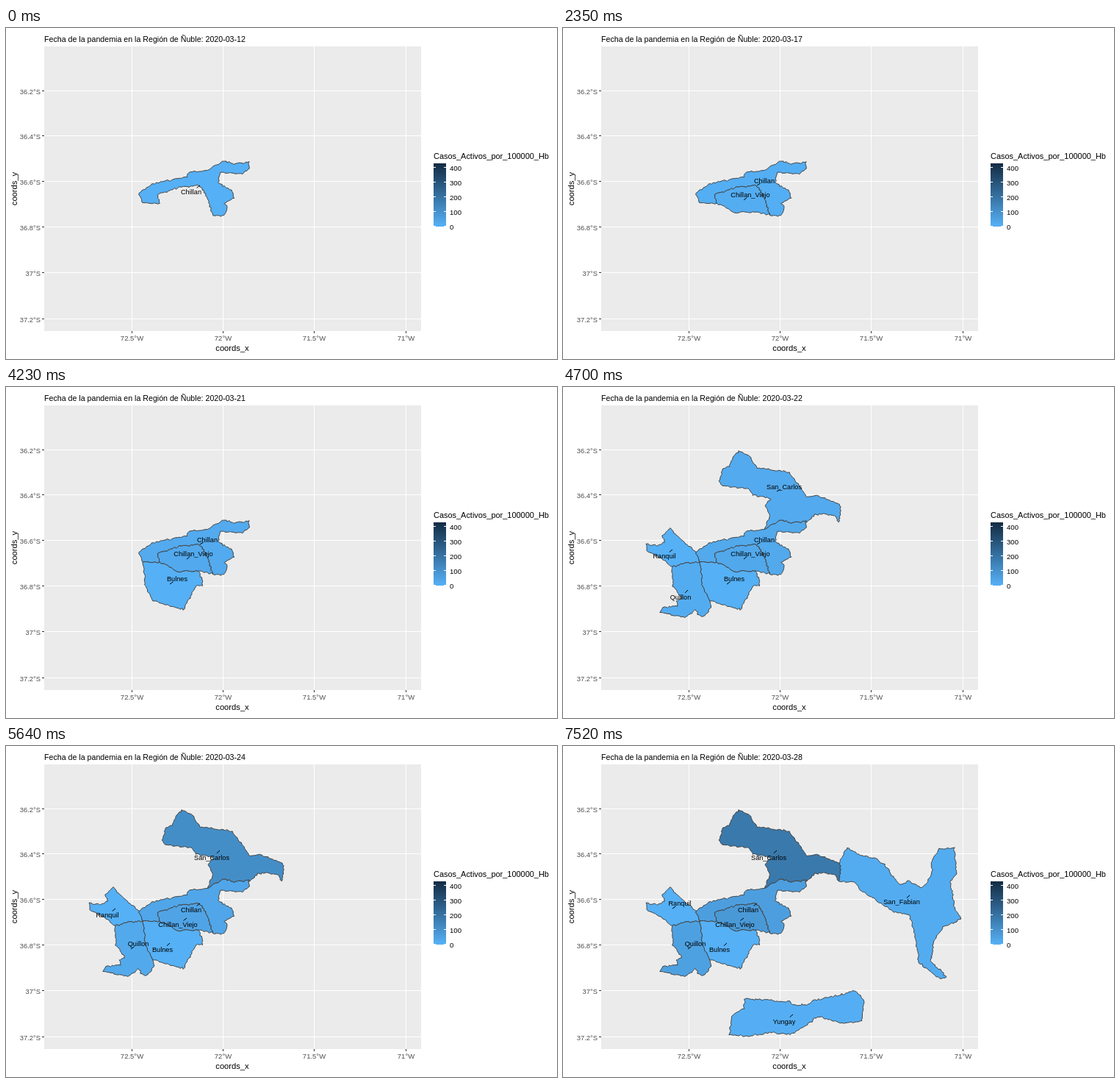
Recreate the animation shown at these times as an HTML page with a canvas. Size 750 by 450 pixels, loop 7.99 s.

```html
<!DOCTYPE html>
<html lang="es">
<head>
<meta charset="utf-8">
<style>
html, body { margin: 0; width: 100%; height: 100%; overflow: hidden; background: #fff; }
canvas { display: block; }
</style>
</head>
<body>
<canvas id="stage" width="750" height="450"></canvas>
<script>
const ctx = document.getElementById('stage').getContext('2d');
const STEP = 470, STEPS = 17, LAST = STEPS - 1;

// Key points of borders shared by two regions; outline() adds the fine detail.
const carlosChillan = '273,193 285,186 297,180 308,184 330,182';
const chillanViejo = '281,254 273,229 263,213 236,216 206,226 209,238';
const chillanBulnes = '209,238 186,238';
const chillanRanquil = '186,238 180,223';
const viejoBulnes = '209,238 218,241 232,251 262,249';
const bulnesQuillon = '186,238 189,270 200,290';
const ranquilQuillon = '186,238 165,239 148,244';
const carlosFabian = '375,158 378,168 374,184';
const back = border => border.split(' ').reverse().join(' ');

// Labels flip above (1) or below (0) their point at each step.
const flips = step => '01110110111001010'[step] === '1';
const never = () => false;

// shade: first and last percent of the colour scale, and the power of the growth curve.
const regions = [
  { name: 'Chillan', start: 0, point: [264, 214], below: [252, 223], above: [274, 208], isAbove: flips, shade: [1, 14, 2],
    path: `180,223 200,211 224,206 245,202 249,195 ${carlosChillan} 330,190 322,198 291,195 288,210 306,220 310,230 297,238 301,243 296,255 ${chillanViejo} ${chillanBulnes} ${chillanRanquil}` },
  { name: 'Chillan_Viejo', start: 4, point: [246, 234], below: [234, 243], above: [255, 227], isAbove: flips, shade: [3, 18, 2],
    path: `${chillanViejo} ${viejoBulnes}` },
  { name: 'Bulnes', start: 8, point: [223, 268], below: [213, 277], above: [233, 261], isAbove: flips, shade: [1, 1, 1],
    path: `${viejoBulnes} 268,269 258,270 241,302 222,297 ${back(bulnesQuillon)} ${back(chillanBulnes)}` },
  { name: 'San_Carlos', start: 10, point: [291, 142], below: [280, 152], above: [301, 136], isAbove: flips, shade: [5, 42, 0.5],
    path: `239,87 253,94 264,109 292,113 307,115 332,149 346,147 ${carlosFabian} 371,176 354,171 343,173 330,184 ${back(carlosChillan)} 281,176 275,162 282,151 258,146 252,137 216,134 212,127 217,111 226,107 233,92` },
  { name: 'Ranquil', start: 10, point: [149, 221], below: [138, 230], above: [159, 214], isAbove: step => step % 2 || step === LAST, shade: [1, 1, 1],
    path: `145,192 158,205 ${back(chillanRanquil)} ${ranquilQuillon} 131,231 113,222 113,213 130,215 138,210 135,202` },
  { name: 'Quillon', start: 10, point: [170, 276], below: [160, 286], above: [180, 269], isAbove: step => step > 11, shade: [4, 12, 1.5],
    path: `${back(ranquilQuillon)} ${bulnesQuillon} 201,298 193,311 184,310 180,302 167,313 132,306 136,299 156,297 153,291 161,287 149,270` },
  { name: 'San_Fabian', start: 16, point: [472, 203], below: [461, 212], isAbove: never, shade: [4, 4, 1],
    path: `375,158 386,138 402,147 425,153 437,160 453,183 461,188 469,182 486,192 494,188 502,170 500,158 512,139 532,138 535,174 527,184 533,222 542,235 517,246 504,266 500,292 522,313 512,316 484,294 480,262 471,230 448,224 404,195 396,184 ${back(carlosFabian)}` },
  { name: 'Yungay', start: 16, point: [313, 365], below: [301, 375], isAbove: never, shade: [2, 2, 1],
    path: `226,392 229,366 246,356 247,343 308,347 313,352 332,351 340,346 384,336 397,332 409,345 406,374 377,376 346,367 328,382 309,391 283,389 250,394` }
];

const noise = (x, y) => {
  const v = Math.sin(x * 12.9898 + y * 78.233) * 43758.5453;
  return (v - Math.floor(v)) * 2 - 1;
};

// Roughens each edge by position only, so neighbours keep a common border.
function outline(path) {
  const points = path.split(' ').map(pair => pair.split(',').map(Number));
  const shape = new Path2D();
  points.forEach(([x, y], i) => {
    const [nx, ny] = points[(i + 1) % points.length];
    const pieces = Math.max(1, Math.round(Math.hypot(nx - x, ny - y) / 2.5));
    for (let k = 0; k < pieces; k++) {
      const px = Math.round(x + (nx - x) * k / pieces + 0.01);
      const py = Math.round(y + (ny - y) * k / pieces + 0.01);
      shape.lineTo(px + noise(px, py) + 0.5, py + noise(py, px) + 0.5);
    }
  });
  shape.closePath();
  return shape;
}
regions.forEach(region => region.shape = outline(region.path));

const LOW = [86, 177, 247], HIGH = [19, 43, 67];
const scaleColor = f => `rgb(${LOW.map((c, i) => Math.round(c + (HIGH[i] - c) * f))})`;

function text(str, x, y, size, align = 'left', color = '#000') {
  ctx.font = `${size}px "Liberation Sans", Arial, sans-serif`;
  ctx.textAlign = align;
  ctx.fillStyle = color;
  ctx.fillText(str, x, y);
}
function box(x, y, w, h, color) {
  ctx.fillStyle = color;
  ctx.fillRect(x, y, w, h);
}

function drawAxes() {
  box(52, 25, 513, 387, '#ebebeb');
  for (let i = 0; i < 6; i++) {
    const y = Math.round(85 + 61.3 * i + 0.14 * i * i); // spacing grows southward
    box(52, y, 513, 1, '#fff');
    box(49, y, 3, 1, '#333');
    text((362 + 2 * i) / 10 + '°S', 47, y + 5, 9.4, 'right', '#4d4d4d');
  }
  for (let i = 0; i < 4; i++) {
    const x = Math.round(170.5 + i * 124.4);
    box(x, 25, 1, 387, '#fff');
    box(x, 412, 1, 3, '#333');
    text(72.5 - i / 2 + '°W', x + 0.5, 425, 9.5, 'center', '#4d4d4d');
  }
  text('coords_x', 308, 439, 11.2, 'center');
  ctx.save();
  ctx.translate(15, 218.5);
  ctx.rotate(-Math.PI / 2);
  text('coords_y', 0, 0, 11.2, 'center');
  ctx.restore();
}

function drawLegend() {
  text('Casos_Activos_por_100000_Hb', 582, 178, 10.95);
  const ramp = ctx.createLinearGradient(0, 184, 0, 270);
  ramp.addColorStop(0, scaleColor(1));
  ramp.addColorStop(1, scaleColor(0));
  box(582, 184, 17, 86, ramp);
  for (let i = 0; i < 5; i++) {
    const y = 189 + i * 20;
    box(582, y, 3, 1, '#fff');
    box(596, y, 3, 1, '#fff');
    text(400 - i * 100, 604, y + 5, 9.6);
  }
}

function drawRegion({ shape, start, shade: [from, to, power] }, step) {
  const growth = start < LAST ? ((step - start) / (LAST - start)) ** power : 0;
  ctx.fillStyle = scaleColor((from + (to - from) * growth) / 100);
  ctx.fill(shape);
  ctx.strokeStyle = '#444';
  ctx.stroke(shape);
}

function drawLabel(region, step) {
  const [lx, ly] = region.isAbove(step) ? region.above : region.below;
  const [x, y] = region.point;
  const reach = 5.5 / Math.hypot(lx - x, ly - y);
  ctx.strokeStyle = '#000';
  ctx.beginPath();
  ctx.moveTo(x, y);
  ctx.lineTo(x + (lx - x) * reach, y + (ly - y) * reach);
  ctx.stroke();
  text(region.name, lx, ly + 3, 9.2, 'center');
}

function draw(now) {
  const step = Math.floor(now % (STEP * STEPS) / STEP);
  box(0, 0, 750, 450, '#fff');
  ctx.lineWidth = 1;
  text('Fecha de la pandemia en la Región de Ñuble: 2020-03-' + (12 + step), 52, 19, 10.65);
  drawAxes();
  drawLegend();
  const visible = regions.filter(region => region.start <= step);
  visible.forEach(region => drawRegion(region, step));
  visible.forEach(region => drawLabel(region, step));
  requestAnimationFrame(draw);
}
requestAnimationFrame(draw);
</script>
</body>
</html>
```
